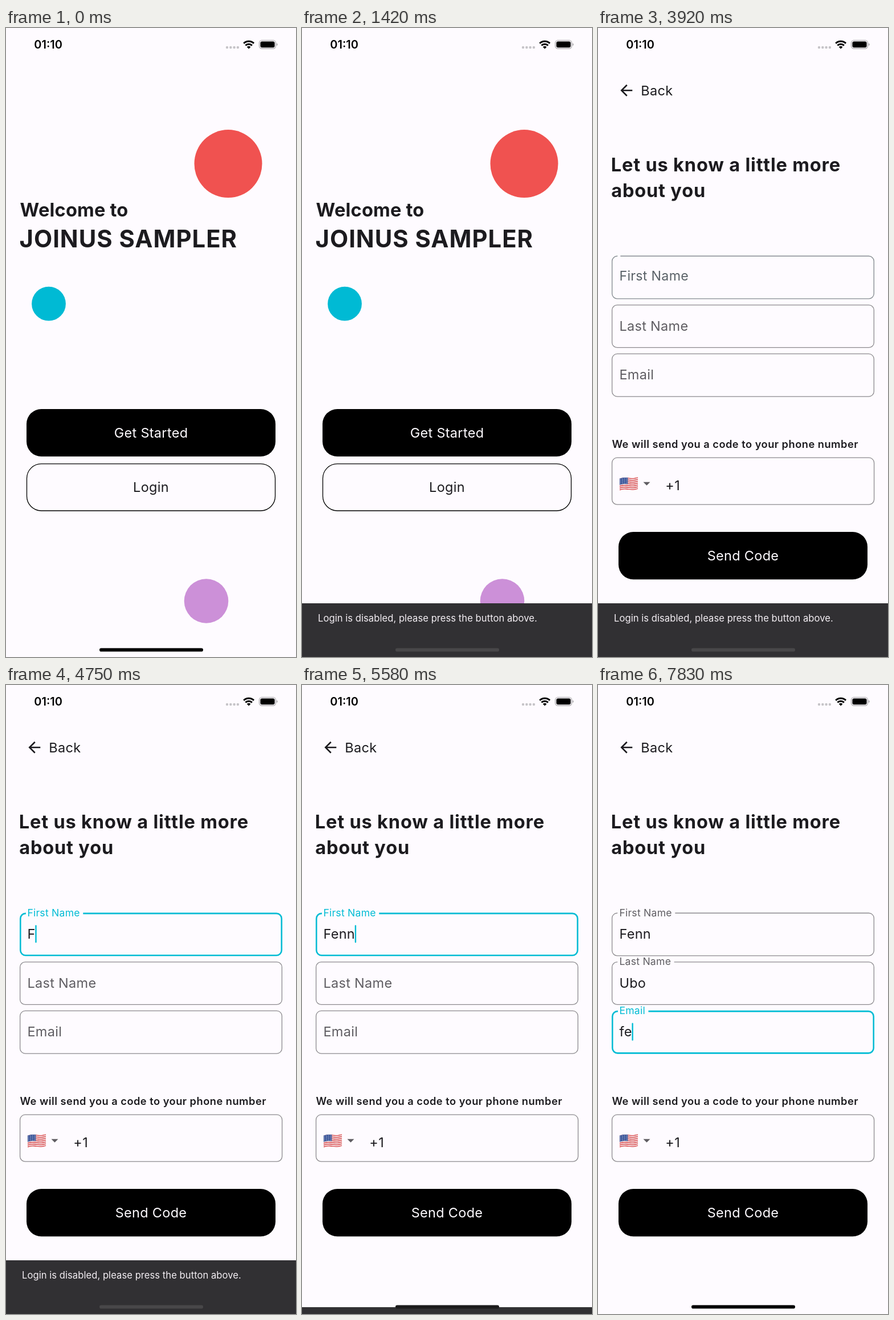
Animation of 509x1101 px, one loop 8000 ms. Source, as an HTML page:

```html
<!DOCTYPE html>
<html lang="en">
<head>
<meta charset="utf-8">
<title>Signup flow</title>
<style>
  html, body { margin: 0; width: 100%; height: 100%; overflow: hidden; background: #fefbff; }
  svg { display: block; width: 100%; height: 100%; }
  text {
    font-family: Inter, "Liberation Sans", sans-serif;
    font-optical-sizing: none;
    font-size: 23.5px;
    letter-spacing: .3px;
    fill: #1c1b1f;
    white-space: pre;
  }
  .mid { text-anchor: middle; }
  .light { fill: #fefbff; }
  .head { font-size: 32.6px; font-weight: 700; letter-spacing: .8px; }
  .hello { letter-spacing: .2px; }
  .title { font-size: 41.8px; font-weight: 700; letter-spacing: 1px; }
  .hint { font-size: 18.3px; font-weight: 600; letter-spacing: .47px; }
  .note { font-size: 16.6px; letter-spacing: .04px; fill: #f4eff4; }
  .clock { font-size: 20px; font-weight: 600; letter-spacing: 0; fill: #000; }
  .line { fill: none; stroke: #8c8a8e; stroke-width: 1.3; }
</style>
</head>
<body>
<svg id="stage" viewBox="0 0 509 1101" preserveAspectRatio="none">
  <defs>
    <linearGradient id="edge">
      <stop offset="0" stop-opacity="0"/>
      <stop offset=".3" stop-opacity=".016"/>
      <stop offset=".6" stop-opacity=".07"/>
      <stop offset="1" stop-opacity=".22"/>
    </linearGradient>
    <clipPath id="flagClip"><path id="flagShape"/></clipPath>
  </defs>
  <rect width="509" height="1101" fill="#fefbff"/>

  <g id="welcome">
    <circle cx="390" cy="237.6" r="59.5" fill="#f05250"/>
    <circle cx="75" cy="482.7" r="29.9" fill="#00bad4"/>
    <circle cx="351.5" cy="1003" r="38.8" fill="#cc90d8"/>
    <text class="head hello" x="24.5" y="330">Welcome to</text>
    <text class="title" x="23.5" y="383.5">JOINUS SAMPLER</text>
    <rect x="36" y="667" width="437" height="83" rx="26"/>
    <text class="mid light" x="254.5" y="717.3">Get Started</text>
    <rect x="36.5" y="762.9" width="436" height="82.1" rx="25.4" fill="none" stroke="#000" stroke-width="1.3"/>
    <text class="mid" x="254.5" y="812">Login</text>
  </g>

  <g id="form">
    <rect x="-26" width="26" height="1101" fill="url(#edge)"/>
    <rect width="509" height="1101" fill="#fefbff"/>
    <path transform="translate(34.2 93.6) scale(1.305)" fill="#1c1b1f"
      d="M20 11H7.83l5.59-5.59L12 4l-8 8 8 8 1.41-1.41L7.83 13H20v-2z"/>
    <text x="75.3" y="118">Back</text>
    <text class="head" x="22.8" y="251">Let us know a little more</text>
    <text class="head" x="23.2" y="296">about you</text>
    <g id="fields"></g>
    <text class="hint" x="24.4" y="734.5">We will send you a code to your phone number</text>
    <rect class="line" x="24.6" y="752.2" width="460" height="82" rx="9"/>
    <g id="flag" clip-path="url(#flagClip)"></g>
    <path d="M79.5 794.8h12l-6 6z" fill="#5f5d62"/>
    <text x="118.3" y="809.3">+1</text>
    <rect x="36" y="882" width="437" height="83.3" rx="26"/>
    <text class="mid light" x="254.5" y="932.3">Send Code</text>
  </g>

  <g id="snack">
    <rect y="1007" width="509" height="94.5" fill="#313033"/>
    <text class="note" x="28" y="1039.4">Login is disabled, please press the button above.</text>
  </g>

  <text class="clock" x="49.3" y="36">01:10</text>
  <g fill="#c6c4c8">
    <circle cx="388" cy="34" r="2.2"/><circle cx="394.3" cy="34" r="2.2"/>
    <circle cx="400.6" cy="34" r="2.2"/><circle cx="406.9" cy="34" r="2.2"/>
  </g>
  <g fill="none" stroke="#000" stroke-width="2.9">
    <path d="M417.2 26.9a12.7 12.7 0 0 1 17.8 0"/>
    <path d="M420.3 30.6a8.2 8.2 0 0 1 11.6 0"/>
  </g>
  <path d="M422.8 33.2a4.7 4.7 0 0 1 6.6 0l-3.3 3.2z"/>
  <rect x="444.5" y="21.5" width="29" height="14.6" rx="4.6" fill="none" stroke="#a5a3a7" stroke-width="1.2"/>
  <rect x="446.4" y="23.4" width="25.2" height="10.8" rx="3"/>
  <path d="M475 26.4q1.7 .8 1.7 2.4t-1.7 2.4z" fill="#a5a3a7"/>
  <rect id="home" x="164" y="1085.4" width="182" height="6.2" rx="3.1"/>
</svg>

<script>
const LOOP = 8000, STEP = 1000 / 12;
const SNACK_IN = 1125, SNACK_OUT = 5383;
const GREY = [140, 138, 142], INK = [95, 93, 98], CYAN = [0, 188, 212];
const THIN = 1.3, THICK = 2.6, RADIUS = 9, TEXT_X = 37.4;

const $ = id => document.getElementById(id);
const clamp = v => Math.min(1, Math.max(0, v));
const ramp = (t, start, length) => clamp((t - start) / length);
const lerp = (a, b, p) => a + (b - a) * p;
const mix = (a, b, p) => `rgb(${a.map((v, i) => Math.round(lerp(v, b[i], p)))})`;

function add(parent, tag, attrs = {}) {
  const node = document.createElementNS('http://www.w3.org/2000/svg', tag);
  for (const name in attrs) node.setAttribute(name, attrs[name]);
  return parent.appendChild(node);
}

// cubic-bezier(.4, 0, .2, 1)
function ease(x) {
  let lo = 0, hi = 1;
  for (let i = 0; i < 24; i++) {
    const s = (lo + hi) / 2, r = 1 - s;
    if (1.2 * r * r * s + .6 * r * s * s + s ** 3 < x) lo = s; else hi = s;
  }
  return lo * lo * (3 - 2 * lo);
}

const fields = [
  { label: 'First Name', y: 398.6, text: 'Fenn', on: 3890, off: 5635, keys: [4500, 4830, 5000, 5250] },
  { label: 'Last Name', y: 484.2, text: 'Ubo', on: 5635, off: 6890, keys: [6160, 6330, 6580] },
  { label: 'Email', y: 569.8, text: 'fe', on: 6890, off: LOOP + 1, keys: [7580, 7830] }
];

for (const f of fields) {
  const g = add($('fields'), 'g');
  f.box = add(g, 'path', { class: 'line' });
  f.tag = add(g, 'text');
  f.tag.textContent = f.label;
  f.value = add(g, 'text', { x: TEXT_X, y: f.y + 45.4 });
  f.caret = add(g, 'rect', { y: f.y + 21.7, width: 2.4, height: 31, rx: 1.2, fill: mix(CYAN, CYAN, 0) });
}

function drawField(f, t) {
  const up = ease(ramp(t, f.on, 200));
  const focus = up - ease(ramp(t, f.off, 200));

  // the border grows inwards from a fixed outer edge
  const weight = lerp(THIN, THICK, focus), inset = weight / 2, r = RADIUS;
  const left = 24 + inset, right = 485 - inset;
  const top = f.y + inset, bottom = f.y + 75.9 - inset;
  const gapStart = left + r + .6;
  const gapEnd = TEXT_X + f.tag.getComputedTextLength() * .75 + 5.5;
  const arc = (x, y) => `a${r} ${r} 0 0 1 ${x} ${y}`;
  f.box.setAttribute('d', `M${lerp(gapStart, gapEnd, up)} ${top}H${right - r}${arc(r, r)}V${bottom - r}` +
    `${arc(-r, r)}H${left + r}${arc(-r, -r)}V${top + r}${arc(r, -r)}H${gapStart}`);
  f.box.style.stroke = mix(GREY, CYAN, focus);
  f.box.style.strokeWidth = weight;

  const baseline = lerp(f.y + 45.4, f.y + 5.9 + focus * .6, up);
  f.tag.setAttribute('transform', `translate(${TEXT_X} ${baseline}) scale(${lerp(1, .75, up)})`);
  f.tag.style.fill = mix(INK, CYAN, focus);

  const typed = f.text.slice(0, f.keys.filter(k => t >= k).length);
  f.value.textContent = typed;
  const width = typed ? f.value.getComputedTextLength() : 0;
  f.caret.setAttribute('x', TEXT_X + width - .3);
  f.caret.setAttribute('visibility', t >= f.on + 60 && t < f.off ? 'inherit' : 'hidden');
}

function buildFlag() {
  const x0 = 37.8, width = 32.4, band = 1.62, y0 = 786.4;
  const wave = (y, from = 0, to = 1) => Array.from({ length: 13 }, (_, i) => {
    const p = lerp(from, to, i / 12);
    return `${x0 + p * width} ${y + 2 - 2.4 * p - 1.1 * Math.sin(p * 2 * Math.PI)}`;
  });
  const strip = (y, h, to = 1) => `M${[...wave(y, 0, to), ...wave(y + h, to, 0)].join('L')}Z`;
  $('flagShape').setAttribute('d', strip(y0, band * 13));
  const paint = (d, fill) => add($('flag'), 'path', { d, fill });
  paint(strip(y0, band * 13), '#f4f1f3');
  for (let i = 0; i < 13; i += 2) paint(strip(y0 + i * band, band), '#dc4a4c');
  paint(strip(y0, band * 7, .45), '#3f5a9c');
  for (let i = 0; i < 20; i++) {
    const [x, y] = wave(y0 + 1.6 + (i >> 2) * 2.1, .05 + i % 4 * .115)[0].split(' ');
    add($('flag'), 'circle', { cx: x, cy: y, r: .5, fill: '#e9edf6' });
  }
}

function draw(t) {
  const slide = 15 * (1 - ramp(t, 3083, 150)) ** 2;
  const onForm = t >= 3080;
  $('form').setAttribute('visibility', onForm ? 'visible' : 'hidden');
  $('form').setAttribute('transform', `translate(${slide} 0)`);
  $('welcome').setAttribute('transform', `translate(${onForm ? -(509 - slide) / 3 : 0} 0)`);
  for (const f of fields) drawField(f, t);

  const shown = ramp(t, SNACK_IN, 250) - ramp(t, SNACK_OUT, 250);
  $('snack').setAttribute('transform', `translate(0 ${94.5 * (1 - ease(shown))})`);
  const glow = ramp(t, SNACK_IN, 250) - ramp(t, 5417, 270);
  $('home').setAttribute('fill', mix([0, 0, 0], [72, 71, 73], glow));
}

buildFlag();
const start = performance.now();
function tick() {
  const t = (performance.now() - start) % LOOP;
  // the picture advances twelve times a second
  draw(Math.floor((t + 4) / STEP) * STEP);
  requestAnimationFrame(tick);
}
tick();
</script>
</body>
</html>
```
